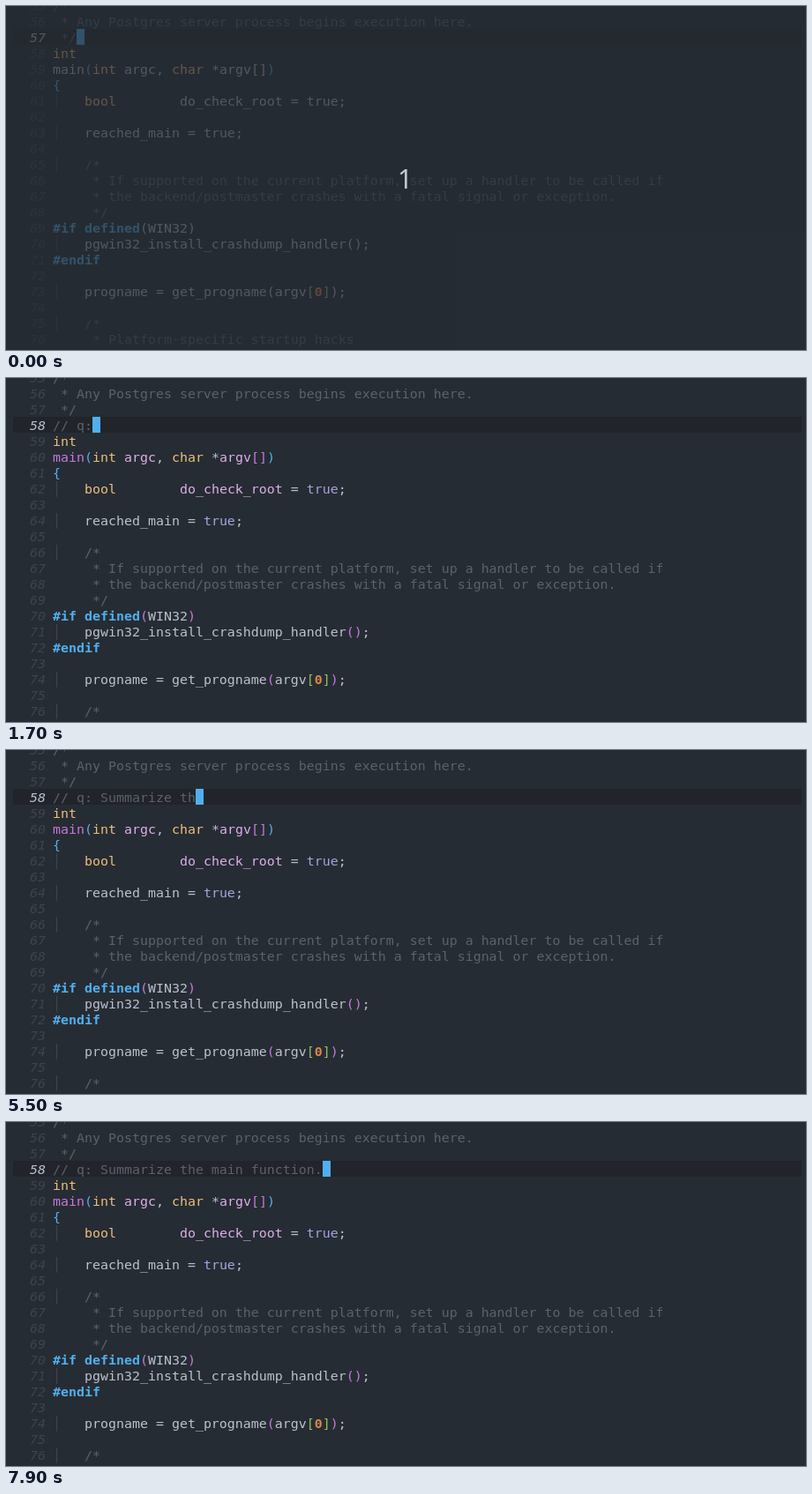
These frames come from a looping animation (907x390 px, 8 s). An HTML page:

```html
<!DOCTYPE html>
<html lang="en">
<head>
<meta charset="utf-8">
<title>Typing a question in an editor</title>
<style>
html, body { margin: 0; width: 100%; height: 100%; overflow: hidden; background: #262c33; }
#stage { position: relative; height: 100%; overflow: hidden; contain: strict; }
#code {
  position: absolute; top: -10px; left: 0; right: 0;
  font: 14.95px/18px "DejaVu Sans Mono", monospace; color: #bbc2cf; white-space: pre;
}
.row { position: relative; height: 18px; }
.num, .text { position: absolute; top: 1px; }
.num { left: 27px; font-style: italic; color: #3f444a; }
.text { left: 53px; }
.now::before { content: ""; position: absolute; left: 8px; width: 894px; height: 18px; background: #21242b; }
.now .num { color: #bbc2cf; }
.g { color: #5b6268; }
.y { color: #ecbe7b; }
.m { color: #c678dd; }
.v { color: #dcaeea; }
.c { color: #a9a1e1; }
.b { color: #51afef; }
.e { color: #98be65; }
.k { color: #51afef; font-weight: bold; }
.o { color: #da8548; font-weight: bold; }
.l { color: #3f444a; }
.dimmed :is(.m, .v, .c) { color: #bbc2cf; }
#cursor { position: absolute; width: 9px; height: 18px; background: #51afef; }
#shade { position: absolute; inset: 0; background: rgba(38, 44, 51, .7); }
#shade span { position: absolute; left: 444px; top: 175px; font: 500 30px/41px "Noto Sans", sans-serif; color: #c3c9d5; }
</style>
</head>
<body>
<div id="stage">
  <div id="code"></div>
  <div id="cursor"></div>
  <div id="shade"><span>1</span></div>
</div>
<script>
const LOOP = 8000, TICK = 100, FIRST = 55, CELL = 9, LEFT = 53, ROW = 18;
const question = '// q: Summarize the main function.';

// x«text» marks text with colour class x
const source = `g«/*»
g« * Any Postgres server process begins execution here.»
g« */»
y«int»
m«main»b«(»y«int» v«argc», y«char» *v«argv»m«[]»b«)»
b«{»
l«│»   y«bool»        v«do_check_root» = c«true»;

l«│»   reached_main = c«true»;

l«│»   g«/*»
g«     * If supported on the current platform, set up a handler to be called if»
g«     * the backend/postmaster crashes with a fatal signal or exception.»
g«     */»
k«#if» k«defined»m«(»WIN32m«)»
l«│»   pgwin32_install_crashdump_handlerm«()»;
k«#endif»

l«│»   progname = get_prognamem«(»argve«[»o«0»e«]»m«)»;

l«│»   g«/*»
g«     * Platform-specific startup hacks»`
  .replace(/([a-z])«(.*?)»/g, '<span class="$1">$2</span>').split('\n');

// Typing speed changes at these points: [seconds, characters typed]
const rhythm = [
  [.8, 1], [1.3, 4], [1.7, 5], [2.3, 6], [2.9, 8], [3.5, 12], [4.1, 14], [4.6, 16],
  [5.4, 16], [5.5, 18], [6.3, 24], [6.5, 25], [6.8, 26], [7.6, 33], [7.9, 34]
];

function typedAt(s) {
  const next = rhythm.findIndex(([at]) => at > s);
  if (next === 0) return 0;
  if (next < 0) return question.length;
  const [[t0, n0], [t1, n1]] = rhythm.slice(next - 1, next + 1);
  return Math.floor(n0 + (n1 - n0) * (s - t0) / (t1 - t0) + 1e-6);
}

const [code, cursor, shade] = ['code', 'cursor', 'shade'].map(id => document.getElementById(id));
let shown = -1;

function render(ms) {
  const step = Math.floor(ms / TICK);
  if (step === shown) return;
  shown = step;

  const t = step * TICK, dimmed = t < 100, inserted = t >= 400;
  const typed = typedAt(t / 1000);
  const active = inserted ? 3 : 2;
  const lines = source.slice();
  if (inserted) lines.splice(active, 0, `<span class="g">${question.slice(0, typed)}</span>`);
  code.className = dimmed ? 'dimmed' : '';
  code.innerHTML = lines.map((line, i) =>
    `<div class="row${i === active ? ' now' : ''}"><span class="num">${FIRST + i}</span><span class="text">${line}</span></div>`
  ).join('');
  cursor.style.left = LEFT + CELL * (inserted ? typed : 3) + 'px';
  cursor.style.top = active * ROW - 10 + 'px';
  shade.style.display = dimmed ? '' : 'none';
}

const start = performance.now();
function tick(now) {
  render(Math.max(0, now - start) % LOOP);
  requestAnimationFrame(tick);
}
render(0);
requestAnimationFrame(tick);
</script>
</body>
</html>
```
